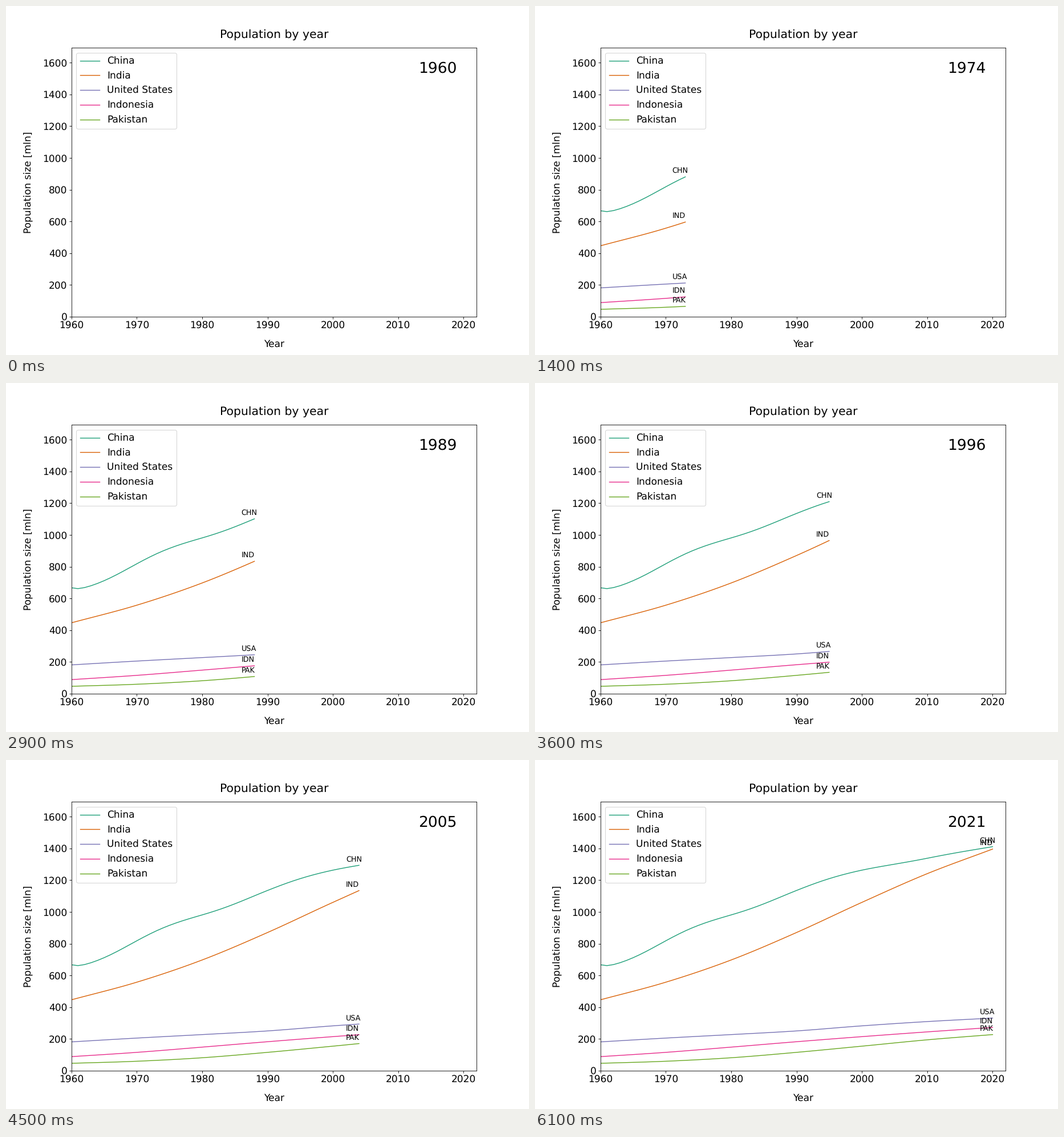
Recreate the animation shown at these times as a matplotlib script. Size 917 px wide and 611 px high, loop 6.2 s.

```python
import numpy as np
import matplotlib.pyplot as plt
from matplotlib.animation import FuncAnimation

DPI = 76.4
EPS = 1e-6  # keeps the pixel size from being truncated
START, END = 1960, 2020
YEARS = np.arange(START, END + 1)
AGE = YEARS - START

plt.rcParams.update({"font.family": "DejaVu Sans", "font.size": 16,
                     "text.hinting": "none"})


def smooth(*decades):
    """Cubic Hermite curve through one value per decade, sampled yearly."""
    y = np.array(decades, float)
    slope = np.gradient(y)
    k = np.minimum(AGE // 10, len(y) - 2)
    t = AGE / 10 - k
    return ((1 + 2 * t) * (1 - t) ** 2 * y[k] + t * (1 - t) ** 2 * slope[k]
            + t ** 2 * (3 - 2 * t) * y[k + 1] + t ** 2 * (t - 1) * slope[k + 1])


# China: a short early dip and a wave that dies away over the trend
dip = 20 * AGE * np.exp(-AGE / 1.5)
wave = 35 * np.sin(np.pi * AGE / 10) * np.exp(-AGE / 19)
china = smooth(667, 818, 981, 1135, 1263, 1338, 1411) - dip - wave

COUNTRIES = [
    ("China", "CHN", "#1b9e77", china),
    ("India", "IND", "#d95f02", smooth(446, 557, 697, 870, 1060, 1241, 1396)),
    ("United States", "USA", "#7570b3",
     smooth(181, 205, 227, 250, 282, 309, 331)),
    ("Indonesia", "IDN", "#e7298a", smooth(88, 115, 148, 182, 214, 244, 272)),
    ("Pakistan", "PAK", "#66a61e", smooth(46, 59, 81, 115, 154, 194, 227)),
]

fig, ax = plt.subplots(figsize=((917 + EPS) / DPI, (611 + EPS) / DPI), dpi=DPI)
ax.set_xlim(START, END + 2)
ax.set_ylim(0, 1.2 * china[-1])
ax.set_title("Population by year", pad=16)
ax.set_xlabel("Year", labelpad=15)
ax.set_ylabel("Population size [mln]", labelpad=15)

lines, tags = [], []
for name, code, color, _ in COUNTRIES:
    lines.append(ax.plot([], [], color=color, lw=1.3, label=name)[0])
    tags.append(ax.annotate(code, (START, 0), fontsize=12))
ax.legend(loc="upper left", labelspacing=0.55)
year_text = ax.text(0.856, 0.909, "", fontsize=25, transform=ax.transAxes)


def update(i):
    year_text.set_text(str(START + i))
    for line, tag, (*_, values) in zip(lines, tags, COUNTRIES):
        line.set_data(YEARS[:i], values[:i])
        tag.set_visible(i > 0)
        if i:
            # tags outside the axes are hidden by the annotation clip
            tag.xy = tag.xyann = (YEARS[i - 1] - 2, values[i - 1] + 25)
    return [*lines, *tags, year_text]


anim = FuncAnimation(fig, update, frames=len(YEARS) + 1, interval=100,
                     init_func=lambda: update(0), repeat=True, repeat_delay=0)
plt.show()
```
